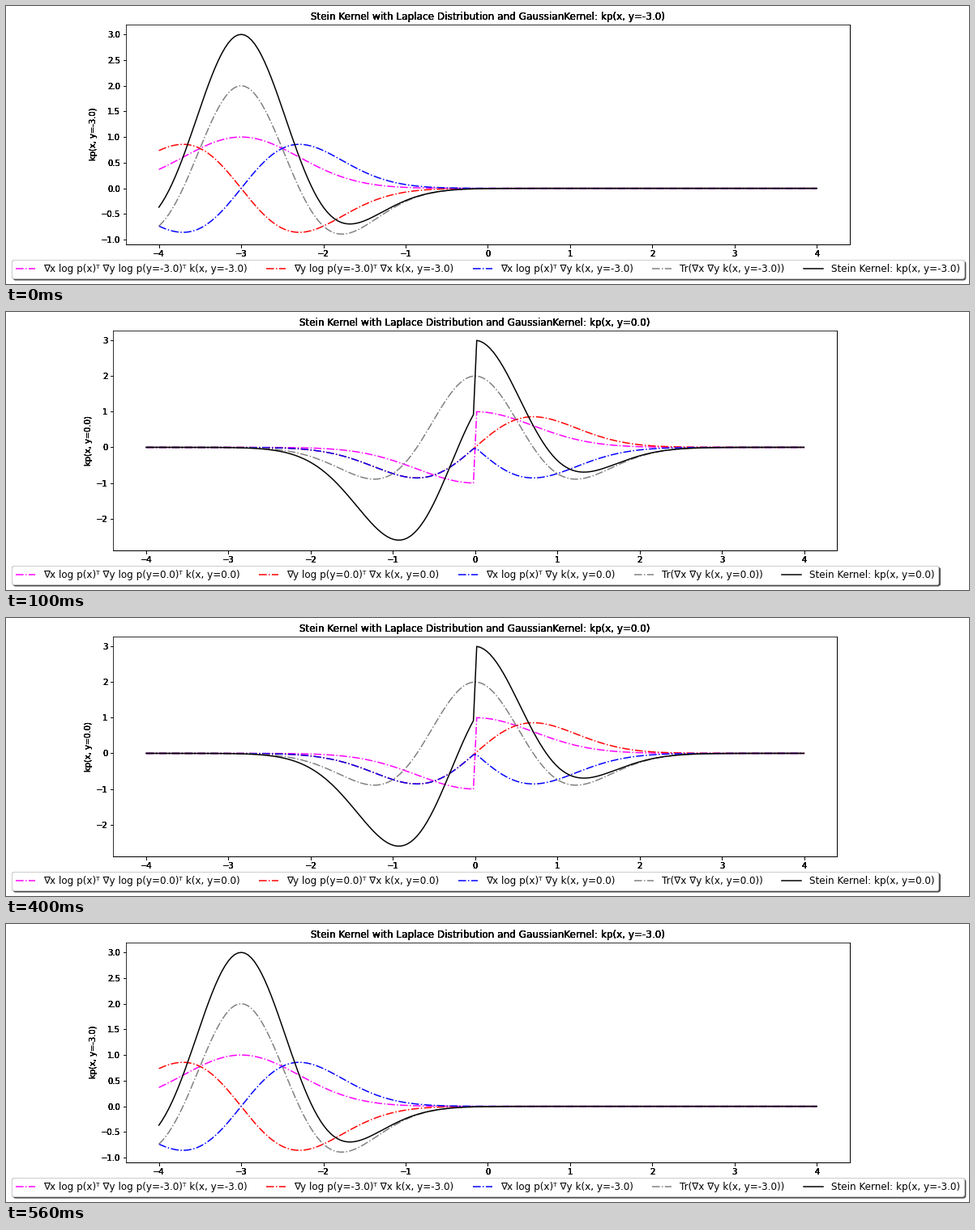
A matplotlib script that plays this animation: 1188x344 px, repeating every 600 ms.

```python
import numpy as np
import matplotlib.pyplot as plt
from matplotlib.animation import FuncAnimation

W, H, DPI = 1188, 344, 72
AX_W, AX_H = 892.8, 271.8   # axes size in pixels
PAD = 7.2                   # margin around the legend
LAYERS = 5                  # stacked axes darken text, ticks and shadow
SWEEP = [-3.0, 0.0, 3.0, 3.0, 0.0, -3.0]

plt.rcParams["font.family"] = "DejaVu Sans"
fig = plt.figure(figsize=(W / DPI, H / DPI), dpi=DPI, facecolor="white")
xs = np.linspace(-4, 4, 200)


def score(v):
    """Gradient of the log density of a standard Laplace distribution."""
    return np.where(v < 0, 1.0, -1.0)


def kernel_terms(x, y):
    d = x - y
    k = np.exp(-d ** 2)
    dx, dy = -2 * d * k, 2 * d * k
    terms = [score(x) * score(y) * k,
             score(y) * dx,
             score(x) * dy,
             (2 - 4 * d ** 2) * k]
    return terms + [sum(terms)]


def draw_axes(y):
    ax = fig.add_axes([0.1, 0.15, AX_W / W, AX_H / H])
    labels = [f"∇x log p(x)ᵀ ∇y log p(y={y})ᵀ k(x, y={y})",
              f"∇y log p(y={y})ᵀ ∇x k(x, y={y})",
              f"∇x log p(x)ᵀ ∇y k(x, y={y})",
              f"Tr(∇x ∇y k(x, y={y}))",
              f"Stein Kernel: kp(x, y={y})"]
    colors = ["magenta", "red", "blue", "gray", "black"]
    styles = ["-."] * 4 + ["-"]
    for vals, label, color, style in zip(kernel_terms(xs, y), labels, colors, styles):
        ax.plot(xs, vals, style, color=color, label=label)
    ax.set_title(f"Stein Kernel with Laplace Distribution and GaussianKernel: kp(x, y={y})")
    ax.set_ylabel(f"kp(x, y={y})")
    legend = ax.legend(loc="upper center", bbox_to_anchor=(0.5, -0.05), ncol=5,
                       fontsize=12, fancybox=True, shadow=True)

    # The legend sits in the lower left margin; the axes are centred above it.
    box = legend.get_window_extent()
    left = PAD + box.width / 2 - AX_W / 2
    bottom = PAD + box.height + 6 + 0.05 * AX_H
    ax.set_position([left / W, bottom / H, AX_W / W, AX_H / H])


def update(i):
    fig.clear()
    for _ in range(LAYERS):
        draw_axes(SWEEP[i])
    return []


anim = FuncAnimation(fig, update, frames=len(SWEEP), interval=100,
                     repeat=True, repeat_delay=0, blit=False)
plt.show()
```
